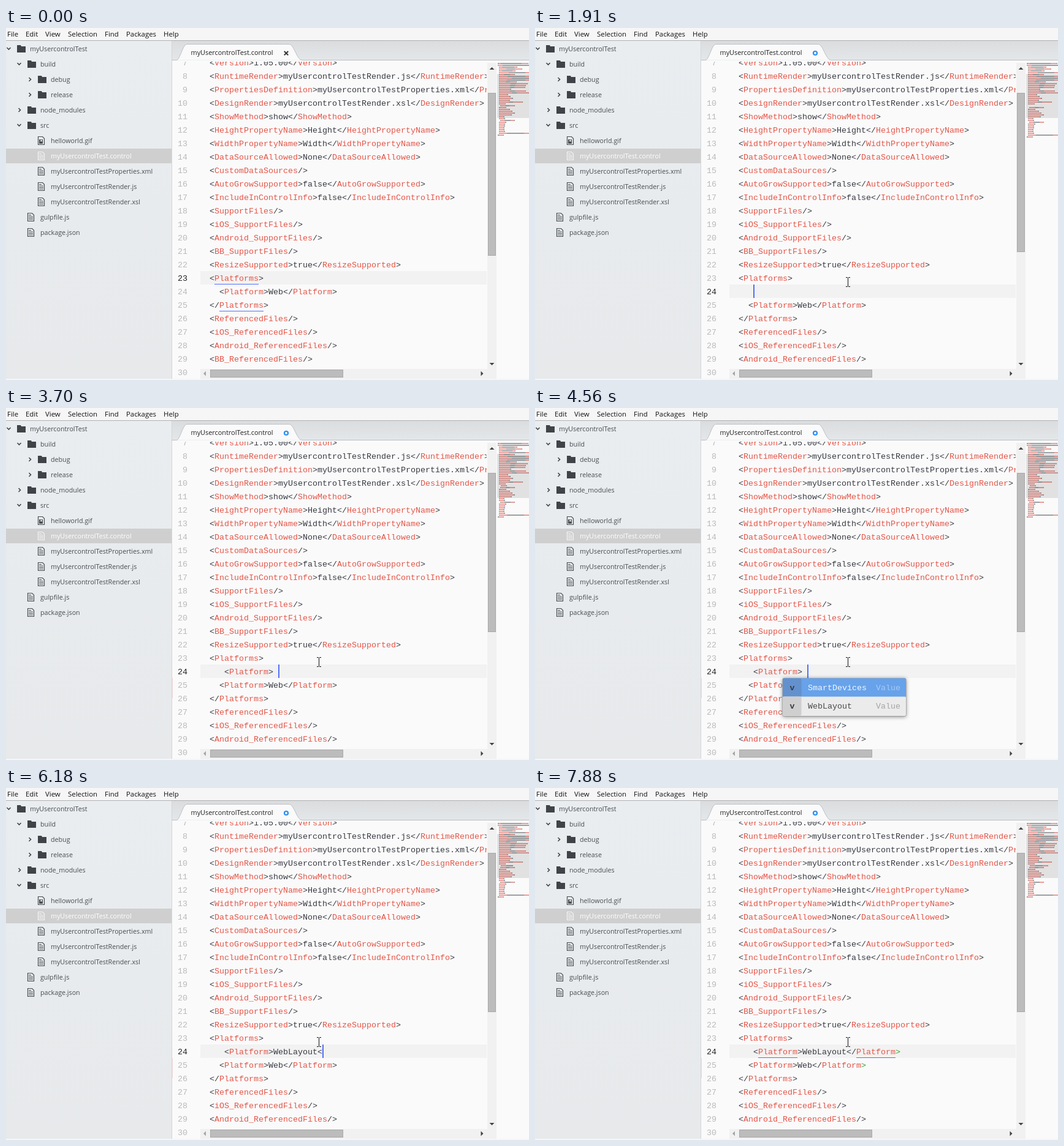
These frames come from a looping animation (853 by 575 pixels, 8000 ms). An HTML page:

```html
<!DOCTYPE html>
<html lang="en">
<head>
<meta charset="utf-8">
<title>Editor autocomplete</title>
<style>
  html, body { margin: 0; width: 100%; height: 100%; overflow: hidden; background: #fafafa; }
  svg { display: block; }
  text { white-space: pre; }
  .ui { font: 10.7px "Open Sans", "Noto Sans", sans-serif; fill: #484c50; }
  .menu { font-size: 11.4px; fill: #111; }
  .title { font-size: 10.9px; fill: #222; }
  .code { font: 13.333px "Liberation Mono", "Noto Sans Mono", monospace; fill: #383a42; }
  .mark { font-weight: 700; }
  .tag { fill: #e45649; }
  .bad, .bad .tag { fill: #35a435; }
  .num { fill: #b9babc; text-anchor: end; }
  .num.on { fill: #222; }
  .num.bad { fill: #35a435; }
  .popup { filter: drop-shadow(0 1px 3px rgba(0, 0, 0, .45)); }
</style>
</head>
<body>
<svg id="stage" width="853" height="575" viewBox="0 0 853 575">
  <defs>
    <clipPath id="view"><rect x="271" y="55" width="513" height="518"/></clipPath>
    <linearGradient id="side" x2="0" y2="1">
      <stop stop-color="#e9edf0"/><stop offset="1" stop-color="#e7e9eb"/>
    </linearGradient>
    <linearGradient id="strip" x2="0" y2="1">
      <stop stop-color="#dadcde"/><stop offset="1" stop-color="#e4e7e9"/>
    </linearGradient>
  </defs>
</svg>
<script>
const LOOP = 8000, COL = 8, ROW = 22, LEFT = 332;
const stage = document.getElementById('stage');

const CODE = `<?xml version="1.0" encoding="utf-8"?><Definition>
<Control xsi:noNamespaceSchemaLocation="Control.xsd">
<Name>myUsercontrolTest</Name>
<Description>UserControl</Description>
<Icon>helloworld.gif</Icon>
<PlatformVersion>myUsercontrolTestVersion</PlatformVersion>
<Version>1.05.00</Version>
<RuntimeRender>myUsercontrolTestRender.js</RuntimeRender>
<PropertiesDefinition>myUsercontrolTestProperties.xml</PropertiesDefinition>
<DesignRender>myUsercontrolTestRender.xsl</DesignRender>
<ShowMethod>show</ShowMethod>
<HeightPropertyName>Height</HeightPropertyName>
<WidthPropertyName>Width</WidthPropertyName>
<DataSourceAllowed>None</DataSourceAllowed>
<CustomDataSources/>
<AutoGrowSupported>false</AutoGrowSupported>
<IncludeInControlInfo>false</IncludeInControlInfo>
<SupportFiles/>
<iOS_SupportFiles/>
<Android_SupportFiles/>
<BB_SupportFiles/>
<ResizeSupported>true</ResizeSupported>
<Platforms>
  <Platform>Web</Platform>
</Platforms>
<ReferencedFiles/>
<iOS_ReferencedFiles/>
<Android_ReferencedFiles/>
<BB_ReferencedFiles/>
<Events/>
<Methods/>
  <Method>Refresh</Method>
<EventList/>
<Targets/>
<Actions/>
<Styles/>
<Themes/>
<Layouts/>
<DefaultClass>myUsercontrolTest.Default</DefaultClass>
</Control>`.split('\n');

const VALUES = [['v', '', 'SmartDevices', 'Value'], ['v', '', 'WebLayout', 'Value']];
const POPUPS = {
  type: { x: 241, w: 234, icon: '#8a8a2c', rows: [['<>', 'xs:string', 'Platform', 'Tag']] },
  value: { x: 404, w: 201, rows: VALUES },
  value2: { x: 404, w: 201, rows: VALUES, pick: 1 },
  value3: { x: 475, w: 201, rows: VALUES },
  close: { x: 484, w: 200, icon: '#9a2a1c', rows: [['<>', '', 'Platform', 'Tag']] }
};

// [start ms, inserted line or null, caret column (-1 hidden), popup]
const OPEN = '   <Platform>';
const DONE = OPEN + 'WebLayout</Platform>';
const STEPS = [
  [0, null, -1], [740, null, 11], [1120, null, -1],
  [1290, '  ', 2], [1800, '   ', 3], [1980, '   <', 4], [2080, '   <', 4, 'type'],
  [2460, '   <', -1, 'type'], [2770, OPEN, 13], [3320, OPEN, -1],
  [3700, OPEN + ' ', 14], [3780, OPEN + ' ', 14, 'value'], [4160, OPEN + ' ', -1, 'value'],
  [4560, OPEN + ' ', 14, 'value'], [4790, OPEN + ' ', 14, 'value2'],
  [4940, OPEN + ' WebLayout', 23], [5320, OPEN + ' WebLayout', 14],
  [5630, OPEN + 'WebLayout', 13], [5860, OPEN + 'WebLayout', 22],
  [6180, OPEN + 'WebLayout<', 23], [6330, OPEN + 'WebLayout<', 23, 'value3'],
  [6730, OPEN + 'WebLayout</', 24], [6880, OPEN + 'WebLayout</', 24, 'close'],
  [7340, DONE, 33], [7880, DONE, -1]
];

function add(parent, name, attrs, text) {
  const node = document.createElementNS('http://www.w3.org/2000/svg', name);
  for (const key in attrs) node.setAttribute(key, attrs[key]);
  if (text !== undefined) node.textContent = text;
  parent.appendChild(node);
  return node;
}
const rect = (p, x, y, width, height, fill, more) => add(p, 'rect', { x, y, width, height, fill, ...more });
const path = (p, d, fill, stroke, width = 1) =>
  add(p, 'path', { d, fill: fill || 'none', stroke: stroke || 'none', 'stroke-width': width });
const label = (p, x, y, cls, text, fill) =>
  add(p, 'text', { x, y, class: cls, ...(fill && { style: 'fill:' + fill }) }, text);
const group = (p, attrs) => add(p, 'g', attrs || {});

// Splits a line into [text, isTagName] pieces.
function tokens(line) {
  const out = [];
  for (const m of line.matchAll(/(<[\/?]?)(\w*)(\/?>)?|[^<]+/g)) {
    if (!m[1]) { out.push([m[0], false]); continue; }
    out.push([m[1], false]);
    if (m[2]) out.push([m[2], true]);
    if (m[3]) out.push([m[3], false]);
  }
  return out;
}

function drawMenu() {
  rect(stage, 0, 0, 853, 20, '#f6f6f6');
  const items = { File: 2, Edit: 32, View: 64, Selection: 101, Find: 161, Packages: 196, Help: 257 };
  for (const name in items) label(stage, items[name], 14, 'ui menu', name);
}

function drawChevron(x, y, open) {
  path(stage, open ? `M${x - 3} ${y - 2}l3 3 3-3` : `M${x - 1} ${y - 3}l3 3-3 3`, 0, '#444', 1.6);
}
function drawFolder(x, y) {
  path(stage, `M${x} ${y - 6}h6l1 2h7v10h-14z`, '#404448');
}
function drawFile(x, y, color, image) {
  path(stage, `M${x + .5} ${y - 6.5}h7l3 3v10h-10z`, 0, color, 1.2);
  if (image) {
    path(stage, `M${x + 2} ${y + 5}v-7h6v7z`, color);
    add(stage, 'circle', { cx: x + 5.5, cy: y, r: 1.5, fill: '#e6e9ec' });
  } else path(stage, `M${x + 2} ${y - 3.5}h4M${x + 2} ${y - 1}h7M${x + 2} ${y + 1.5}h7M${x + 2} ${y + 4}h7`, 0, color);
}

function drawTree() {
  rect(stage, 0, 20, 271, 553, 'url(#side)');
  rect(stage, 0, 197, 270, 24, '#cfcfcf');
  // [depth, kind, name]
  [[0, 'open', 'myUsercontrolTest'], [1, 'open', 'build'], [2, 'shut', 'debug'], [2, 'shut', 'release'],
   [1, 'shut', 'node_modules'], [1, 'open', 'src'], [2, 'image', 'helloworld.gif'],
   [2, 'file', 'myUsercontrolTest.control'], [2, 'file', 'myUsercontrolTestProperties.xml'],
   [2, 'file', 'myUsercontrolTestRender.js'], [2, 'file', 'myUsercontrolTestRender.xsl'],
   [1, 'file', 'gulpfile.js'], [1, 'file', 'package.json']
  ].forEach(([depth, kind, name], i) => {
    const x = 18 + depth * 17, y = 34 + i * 25, picked = i === 7;
    if (kind === 'open' || kind === 'shut') {
      drawChevron(x - 13.5, y, kind === 'open');
      drawFolder(x, y);
    } else drawFile(x, y, picked ? '#f4f4f4' : '#4a4e52', kind === 'image');
    label(stage, x + 21, y + 4, 'ui', name, picked && '#fff');
  });
}

function drawTab() {
  rect(stage, 271, 20, 582, 33, 'url(#strip)');
  path(stage, 'M271 52.5H278C284 52 288 27 295 26.5H462C470 27 474 52 483 52.5H853', '#fafafa', '#bcc0c3');
  rect(stage, 271, 53, 582, 522, '#fafafa');
  rect(stage, 270, 20, 1, 553, '#d3d6d9');
  rect(stage, 0, 20, 853, 1, '#b0b2b4');
  label(stage, 301.5, 44, 'ui title', 'myUsercontrolTest.control');
}

function drawBars() {
  rect(stage, 785, 57, 15, 516, '#f1f1f1');
  rect(stage, 317, 557, 468, 16, '#f1f1f1');
  rect(stage, 333.5, 558.5, 216, 12, '#bcbcbc', { stroke: '#a9a9a9' });
  path(stage, 'M788.5 68l4-4 4 4zM788.5 547l4 4 4-4zM774.5 560.5l4 4-4 4z', '#444');
  path(stage, 'M326 560.5l-4 4 4 4z', '#a5a5a5');
}

function drawMinimap(box, lines) {
  lines.forEach((line, i) => {
    let x = 802 + (i > 1 && i < lines.length - 1 ? 2 : 0);
    for (const [text, tag] of tokens(line)) {
      if (text.trim()) rect(box, x, 57 + i * 3, text.length, 2, tag ? '#e98f88' : '#8f9095', { opacity: .85 });
      x += text.length;
    }
  });
  rect(box, 801, 75, 52, 72, '#000', { opacity: .1 });
}

function drawPopup(box, { x, w, icon, rows, pick = 0 }) {
  const g = group(box, { class: 'popup' });
  const frame = { rx: 2, stroke: '#000', 'stroke-opacity': .25 };
  rect(g, x, 441.5, w, rows.length * 30.5 + 1, '#ebebeb', frame);
  rows.forEach(([mark, type, text, kind], i) => {
    const y = 441 + i * 30, on = i === pick;
    rect(g, x, y + .5, w, 31, on ? '#67a2ea' : '#ebebeb', { rx: 2 });
    rect(g, x, y + .5, 30.5, 31, on ? (icon ? '#6d8bc4' : '#6391cd') : '#cfcfcf', { rx: 2 });
    if (icon) path(g, `M${x + 14} ${y + 12}l-4 4 4 4M${x + 18} ${y + 12}l4 4-4 4`, 0, icon, 1.8);
    else label(g, x + 11.5, y + 20, 'code mark', mark);
    const start = x + 41 + (type ? 82 : 0);
    if (type) label(g, x + 41, y + 20, 'code', type, '#b7d1f5');
    label(g, start, y + 20, 'code', text, on ? '#f2f7fe' : '#4a4a4a');
    label(g, x + w - 9 - kind.length * COL, y + 20, 'code', kind, on ? '#a9c9f3' : '#a5a5a5');
  });
}

drawMenu();
drawTree();
drawTab();
const editor = group(stage, { 'clip-path': 'url(#view)' });
const minimap = group(stage);
drawBars();
const overlay = group(stage);
const mouse = path(stage, 'M-3-7.5h2.5l1 1 1-1h2.5M-3 7.5h2.5l1-1 1 1h2.5M.5-7v14', 0, '#111', 1);
rect(stage, 0, 573, 853, 2, '#f5f6f7');

function drawCode([, insert, caret], t, typing) {
  const added = insert !== null, active = added ? 24 : 23;
  const lines = CODE.slice();
  if (added) lines.splice(23, 0, insert);
  const top = n => 67 + (n - 8) * ROW;
  rect(editor, 317, top(active), 468, ROW, '#f2f2f2');
  if (t >= 2770) rect(editor, 270, 441, 1.5, 33, '#f3b9b9');
  for (let n = 7; n <= 30; n++) {
    const y = top(n) + 16, line = lines[n - 1];
    const bad = typing && (n === 24 || n === 26);
    label(editor, 296, y, `code num${n === active ? ' on' : ''}${typing && n === 24 ? ' bad' : ''}`, n);
    const text = label(editor, LEFT, y, bad ? 'code bad' : 'code', '');
    const parts = tokens(line);
    parts.forEach(([piece, tag], i) => {
      const late = t >= 7340 && (n === 24 || n === 25) && i === parts.length - 1;
      add(text, 'tspan', { class: tag ? 'tag' : late ? 'bad' : '' }, piece);
    });
  }
  const under = (col, len, n) => rect(editor, LEFT + col * COL, top(n) + 21, len * COL, 1, '#526fff');
  if (!added) { under(1, 9, 23); under(2, 9, 25); }
  if (t >= 7420) { under(4, 8, 24); under(24, 8, 24); }
  if (caret >= 0) rect(editor, LEFT + caret * COL, top(active), 2, ROW, '#526fff');
  drawMinimap(minimap, lines);
}

function drawState(step, t) {
  for (const g of [editor, minimap, overlay]) g.replaceChildren();
  drawCode(step, t, step[1] === '   <');
  rect(overlay, 786.5, 106.5, 12, step[1] === null ? 265 : 259, '#bcbcbc', { stroke: '#a9a9a9' });
  if (t >= 1590) add(overlay, 'circle', { cx: 457, cy: 41, r: 3, fill: 'none', stroke: '#2b8ff0', 'stroke-width': 2.2 });
  else path(overlay, 'M453.8 38l6.4 6.4M460.2 38l-6.4 6.4', 0, '#333', 2);
  if (step[3]) drawPopup(overlay, POPUPS[step[3]]);
}

// The pointer glides in along sampled positions, slowing down.
function placeMouse(t) {
  const k = Math.min(1, Math.max(0, Math.floor((t - 70) / 84) / 7));
  const rest = (1 - k) ** 1.6;
  const x = Math.round(510 + 163 * rest), y = Math.round(415 + 127 * rest);
  mouse.setAttribute('transform', `translate(${x} ${y})`);
  mouse.setAttribute('visibility', t < 70 ? 'hidden' : 'visible');
}

const CUTS = [...STEPS.map(s => s[0]), 1590, 7420].sort((a, b) => a - b);
const begin = performance.now();
let shown = -1;
function tick() {
  const t = (performance.now() - begin) % LOOP;
  const cut = CUTS.filter(c => c <= t).pop();
  if (cut !== shown) {
    shown = cut;
    drawState(STEPS.filter(s => s[0] <= cut).pop(), cut);
  }
  placeMouse(t);
  requestAnimationFrame(tick);
}
tick();
</script>
</body>
</html>
```
